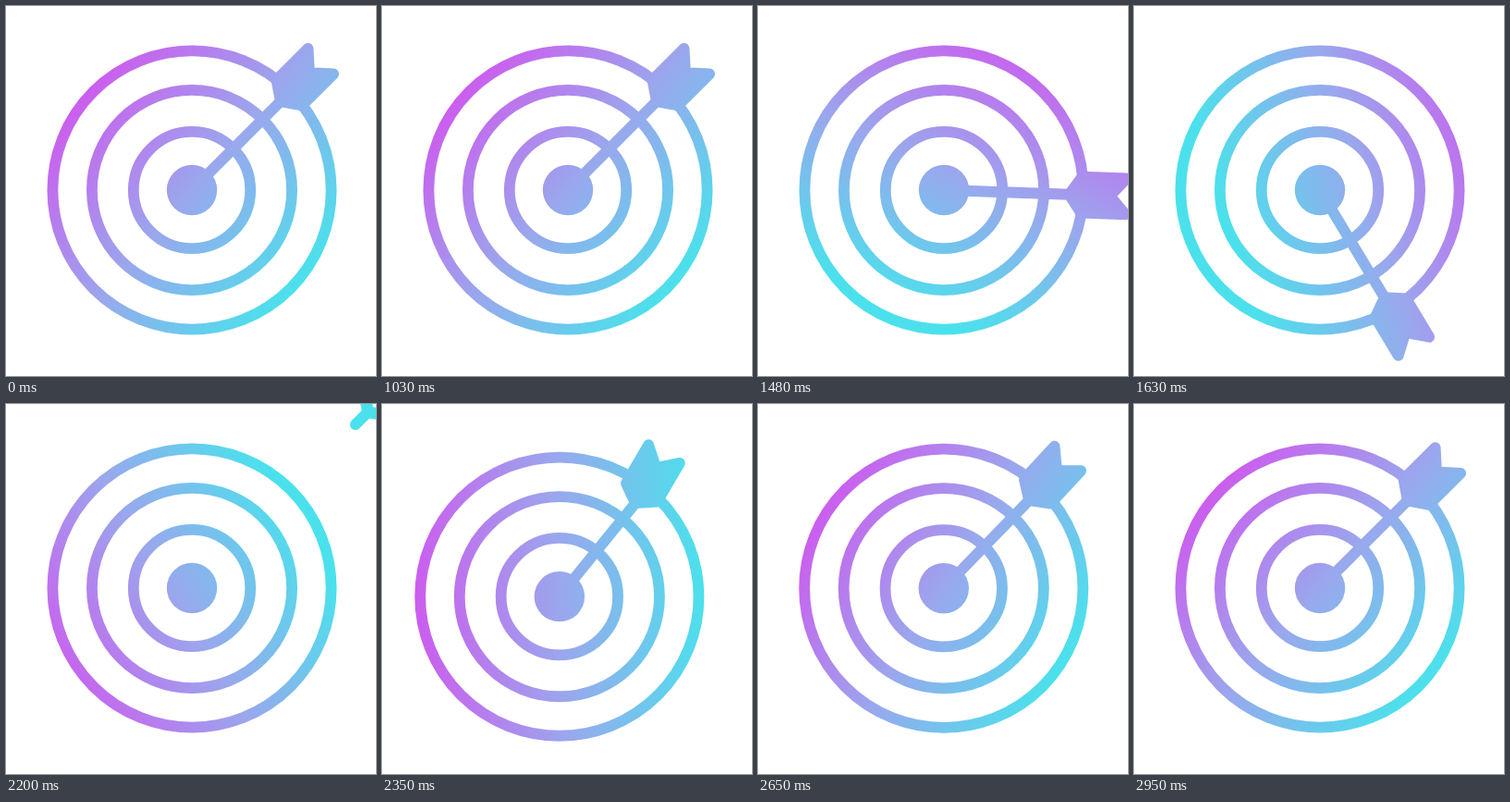
These frames come from a looping animation (400 by 400 pixels, 2980 ms). An HTML page with a canvas:

```html
<!DOCTYPE html>
<html lang="en">
<head>
<meta charset="utf-8">
<title>Target and arrow</title>
<style>
  html, body { margin: 0; width: 100%; height: 100%; overflow: hidden; background: #fff; }
  canvas { display: block; width: 400px; height: 400px; }
</style>
</head>
<body>
<canvas id="stage" width="400" height="400"></canvas>
<script>
const ctx = document.getElementById('stage').getContext('2d');
const LOOP = 2980, HOLD = 1030, STEP = 30;
const CX = 201, CY = 199, LINE = 11.8;
const HIT = 1260;            // impact, ms after the hold
const VERTEX = 135.5;        // where the shaft meets the feathers
const rad = deg => deg * Math.PI / 180;
const clamp = x => Math.min(1, Math.max(0, x));

// Cubic ease with handles at (x1, 0) and (x2, 1), solved by bisection.
function ease(x, x1, x2) {
  let lo = 0, hi = 1;
  for (let i = 0; i < 24; i++) {
    const s = (lo + hi) / 2, r = 1 - s;
    if (3 * r * r * s * x1 + 3 * r * s * s * x2 + s ** 3 < x) lo = s; else hi = s;
  }
  return lo * lo * (3 - 2 * lo);
}

// Damped swing with a half period of 130 ms.
const swing = (ms, size, decay) =>
  ms < 0 ? 0 : size * Math.exp(-decay * ms / 1000) * Math.sin(Math.PI * ms / 130);

function arrowPose(t) {
  const pose = { angle: -45, shift: 0, tip: 0, bend: 0, open: 0 };
  if (t < 1000) {
    pose.angle += 104 * (t / 600) ** 2.76;
    pose.shift = pose.tip = 0.012 * Math.max(0, t - 600) ** 2;
  } else if (t < HIT) {
    const left = (HIT - t) / 90;
    pose.shift = 139 * left - 6;
    pose.tip = 250 * left;
    pose.open = clamp(left);
  } else {
    pose.shift = -6 * Math.exp((HIT - t) / 500);
    pose.bend = swing(t - HIT, -20, 5);
  }
  return pose;
}

function drawTarget() {
  for (const r of [150.6, 108.1, 63.2]) {
    ctx.beginPath();
    ctx.arc(0, 0, r, 0, 7);
    ctx.stroke();
  }
  ctx.beginPath();
  ctx.arc(0, 0, 27.2, 0, 7);
  ctx.fill();
}

function drawArrow({ angle, shift, tip, bend, open }) {
  const base = VERTEX + shift;
  ctx.rotate(rad(angle + 0.4 * bend));
  ctx.beginPath();
  ctx.moveTo(tip, 0);
  ctx.lineTo(base, 0);
  ctx.stroke();

  ctx.translate(base, 0);
  ctx.rotate(rad(0.6 * bend));
  const side = 61.5 - 46 * open, notch = 44 - 43 * open;
  ctx.beginPath();
  ctx.moveTo(0, 0);
  ctx.lineTo(13.3, -19.5);
  ctx.lineTo(side, -19.5);
  ctx.lineTo(notch, 0);
  ctx.lineTo(side, 19.5);
  ctx.lineTo(13.3, 19.5);
  ctx.closePath();
  ctx.fill();
  ctx.stroke();
}

// Tints everything already drawn with a turning gradient.
function tint(t) {
  const turn = ease(clamp(t / 1900), 0.3, 0.45);
  const a = rad(40 + 360 * turn), dx = Math.cos(a), dy = Math.sin(a);
  const drift = 0.2 * Math.sin(Math.PI * turn) ** 2 * 310;
  const at = d => [CX + dx * (d - drift), CY + dy * (d - drift)];
  const fill = ctx.createLinearGradient(...at(-155), ...at(155));
  fill.addColorStop(0, '#cb5eee');
  fill.addColorStop(0.5, '#9aa7ed');
  fill.addColorStop(1, '#4be1ec');
  ctx.globalCompositeOperation = 'source-in';
  ctx.fillStyle = fill;
  ctx.fillRect(0, 0, 400, 400);
}

function draw(t) {
  const push = swing(t - HIT, 17.5, 10.7);
  ctx.clearRect(0, 0, 400, 400);
  ctx.save();
  ctx.lineWidth = LINE;
  ctx.lineCap = ctx.lineJoin = 'round';
  ctx.save();
  ctx.translate(CX - push, CY + push);
  drawTarget();
  drawArrow(arrowPose(t));
  ctx.restore();
  tint(t);
  ctx.restore();
}

const start = performance.now();
function frame() {
  const ms = (performance.now() - start) % LOOP;
  draw(Math.max(0, Math.floor((ms - HOLD) / STEP) * STEP));
  requestAnimationFrame(frame);
}
frame();
</script>
</body>
</html>
```
